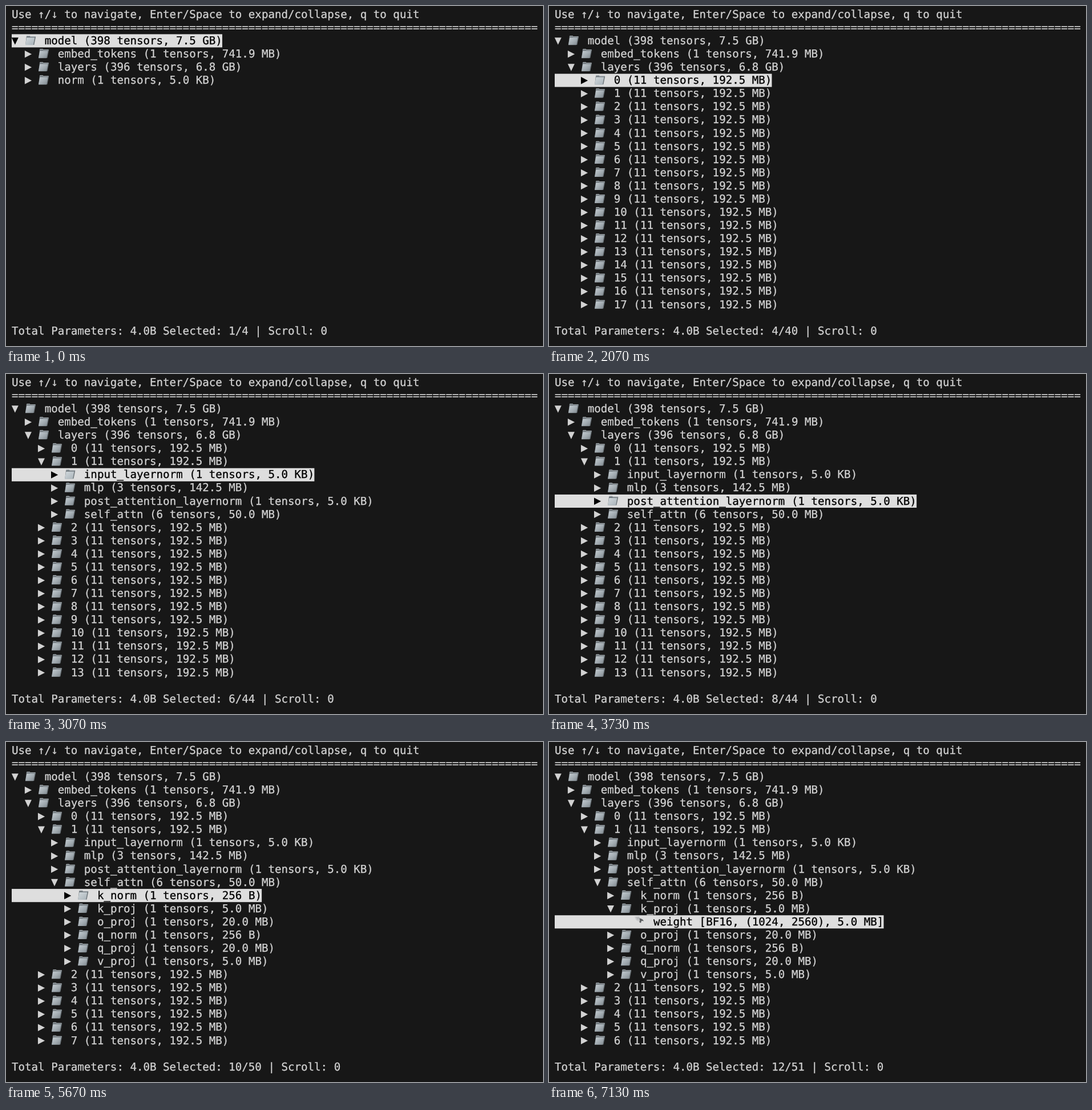
These frames come from a looping animation (941x595 px, 8000 ms). An HTML page:

```html
<!DOCTYPE html>
<html lang="en">
<head>
<meta charset="utf-8">
<title>Tensor tree</title>
<style>
  html, body { margin: 0; width: 100%; height: 100%; overflow: hidden; background: #171717; }
  svg { display: block; width: 941px; height: 595px; }
  text {
    font: 19.15px "DejaVu Sans Mono", "Liberation Mono", monospace;
    fill: #d2d2d2;
    stroke: #d2d2d2;
    stroke-width: .3px;
    text-rendering: geometricPrecision;
    white-space: pre;
  }
  .arrow { fill: #d2d2d2; }
  .bar { fill: #dedede; }
  .on text { fill: #000; stroke: #000; }
  .on .arrow { fill: #000; }
</style>
</head>
<body>
<svg viewBox="0 0 941 595">
  <defs>
    <linearGradient id="front" x1="0" y1="0" x2="1" y2="1">
      <stop offset="0" stop-color="#c6ced3"/>
      <stop offset=".55" stop-color="#a2abb1"/>
      <stop offset="1" stop-color="#7f888e"/>
    </linearGradient>
    <linearGradient id="frontOn" x1="0" y1="0" x2="1" y2="1">
      <stop offset="0" stop-color="#d2d9dd"/>
      <stop offset="1" stop-color="#a9b3b9"/>
    </linearGradient>
    <g id="back">
      <path d="M2.8 4 3.4 2.7H8.6L9.6 3.8H18.6L19 4.8 16.2 18.6H1Z" fill="#6d757a"/>
      <path d="M3.2 4.2 3.7 3.2H8.4L9.4 4.3H18.4" fill="none" stroke="#c3cace" stroke-width=".8"/>
    </g>
    <g id="folder">
      <use href="#back"/>
      <path d="M3.2 6H17.2L14.8 18.8H.8Z" fill="url(#front)"/>
    </g>
    <g id="folderOn">
      <use href="#back"/>
      <path d="M3.2 6H17.2L14.8 18.8H.8Z" fill="url(#frontOn)"/>
    </g>
    <g id="tag">
      <path d="M1.5 2.4 9.5 1.8 12 6 10.6 11.4 4.6 8.8Z" fill="#c9cacb"/>
      <path d="M4 3.2H9.4L10.6 7 6.4 7.6Z" fill="#b7b9bb"/>
      <path d="M10.2 5.2Q16.6 6 17.6 10.4 15 8.8 13.2 10.6L12.8 13.6 10 12.2Q11.6 9 10.2 5.2Z" fill="#5c5e60"/>
    </g>
  </defs>
  <g id="screen"></g>
</svg>
<script>
const LOOP = 8000, LEFT = 10, TOP = 3.2, COL = 11.53, ROW = 23.08, BASE = 17.6, VISIBLE = 21;
const screen = document.getElementById("screen");

const node = (name, info, kids = []) => ({ name, info, kids });
const group = (name, count, size, kids) => node(name, `(${count} tensors, ${size})`, kids);

const attention = [
  group("k_norm", 1, "256 B"),
  group("k_proj", 1, "5.0 MB", [node("weight", "[BF16, (1024, 2560), 5.0 MB]")]),
  group("o_proj", 1, "20.0 MB"),
  group("q_norm", 1, "256 B"),
  group("q_proj", 1, "20.0 MB"),
  group("v_proj", 1, "5.0 MB")
];
const block = [
  group("input_layernorm", 1, "5.0 KB"),
  group("mlp", 3, "142.5 MB"),
  group("post_attention_layernorm", 1, "5.0 KB"),
  group("self_attn", 6, "50.0 MB", attention)
];
const layers = Array.from({ length: 36 }, (_, i) => group(i, 11, "192.5 MB", block));
const model = group("model", 398, "7.5 GB", [
  group("embed_tokens", 1, "741.9 MB"),
  group("layers", 396, "6.8 GB", layers),
  group("norm", 1, "5.0 KB")
]);

// Times of the key presses
const down = [1270, 1470, 2070, 2270, 3070, 3270, 3730, 4800, 5670, 5870, 7130];
const enter = [1670, 2530, 5200, 6270];
const keys = [...down.map(at => ({ at })), ...enter.map(at => ({ at, open: true }))]
  .sort((a, b) => a.at - b.at);

const colX = c => LEFT + c * COL;
const rowY = r => TOP + r * ROW;
const line = (col, row, s) => `<text x="${colX(col)}" y="${rowY(row) + BASE}">${s}</text>`;

function flatten(item, open, depth = 0, list = []) {
  list.push({ item, depth });
  if (open.has(item)) item.kids.forEach(k => flatten(k, open, depth + 1, list));
  return list;
}

function arrow(col, row, isOpen) {
  const d = isOpen ? "m-.2 5.8h12l-6 12.6z" : "m-.2 5.5v12.6l12.2-6.3z";
  return `<path class="arrow" d="M${colX(col)} ${rowY(row)}${d}"/>`;
}

function drawRow({ item, depth }, row, isOpen, on) {
  const col = depth * 2, label = `${item.name} ${item.info}`;
  const leaf = item.name === "weight";
  const icon = leaf ? "tag" : on ? "folderOn" : "folder";
  const bar = on
    ? `<rect class="bar" x="${LEFT}" y="${rowY(row)}" width="${(col + 5 + label.length) * COL}" height="${ROW}"/>`
    : "";
  return `<g class="${on ? "on" : ""}">${bar}${leaf ? "" : arrow(col, row, isOpen)}` +
    `<use href="#${icon}" x="${colX(col + 2)}" y="${rowY(row)}"/>${line(col + 5, row, label)}</g>`;
}

function draw(step) {
  const open = new Set([model]);
  let pick = 0;
  for (const key of keys.slice(0, step)) {
    if (key.open) open.add(flatten(model, open)[pick].item);
    else pick++;
  }
  const list = flatten(model, open);
  screen.innerHTML =
    line(0, 0, "Use ↑/↓ to navigate, Enter/Space to expand/collapse, q to quit") +
    line(0, 1, "=".repeat(80)) +
    list.slice(0, VISIBLE).map((e, i) => drawRow(e, i + 2, open.has(e.item), i === pick)).join("") +
    line(0, 24, `Total Parameters: 4.0B Selected: ${pick + 1}/${list.length} | Scroll: 0`);
}

const start = performance.now();
let shown = -1;
function tick() {
  const t = (performance.now() - start) % LOOP;
  const step = keys.filter(k => k.at <= t).length;
  if (step !== shown) draw(shown = step);
  requestAnimationFrame(tick);
}
tick();
</script>
</body>
</html>
```
